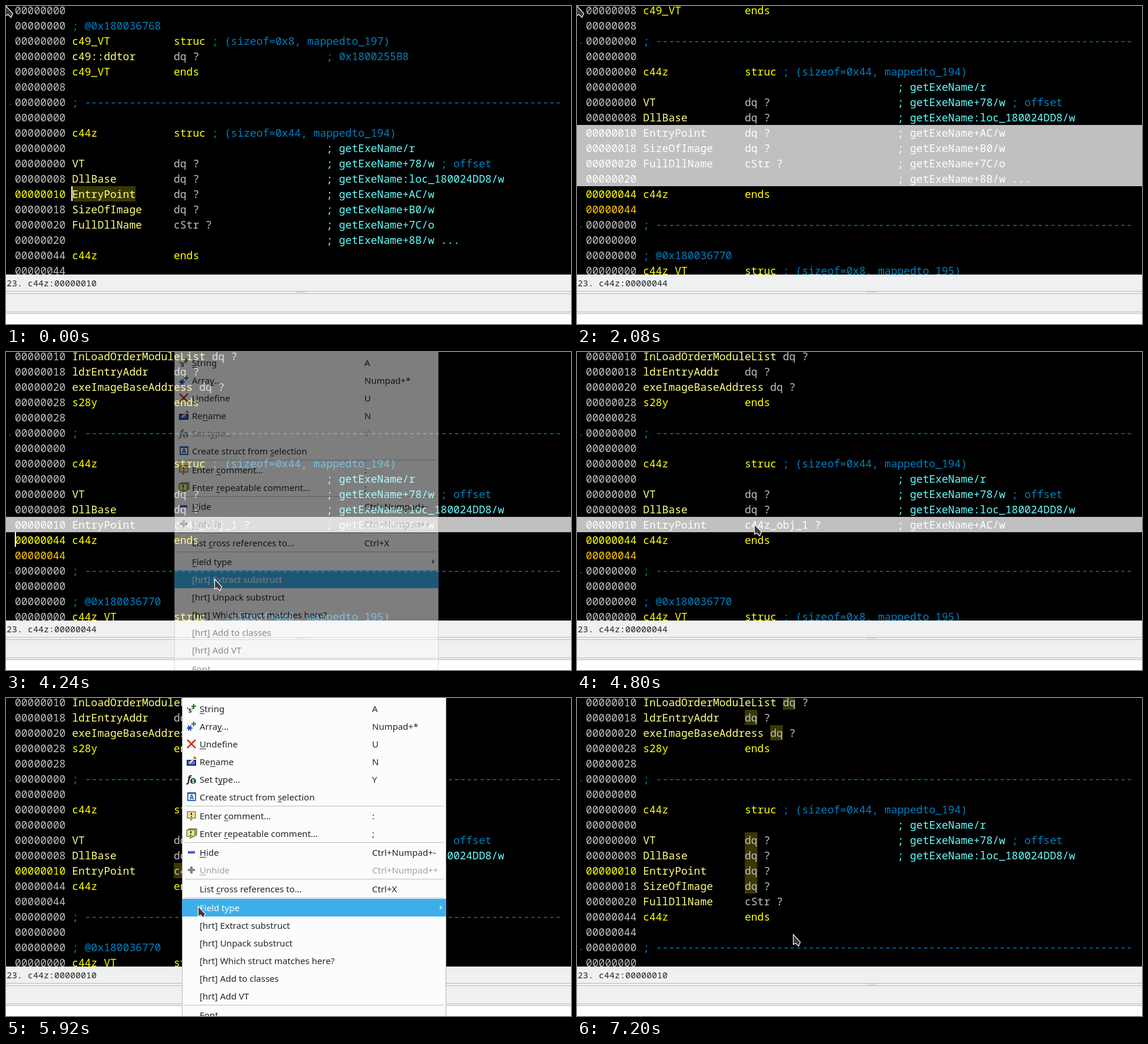
An HTML page with a canvas that plays this animation: 960 px wide and 540 px high, repeating every 7280 ms.

```html
<!DOCTYPE html>
<html>
<head>
<meta charset="utf-8">
<title>Structure editor</title>
<style>
html, body { margin: 0; width: 100%; height: 100%; overflow: hidden; background: #000; }
canvas { display: block; }
</style>
</head>
<body>
<canvas id="stage" width="960" height="540"></canvas>
<script>
const LOOP = 7280, STEP = 80, ROW = 26, CHAR = 10.8;
const MONO = '"Noto Sans Mono", monospace', SANS = '"Noto Sans", sans-serif';
const SILVER = '#c0c0c0', YELLOW = '#ffff00', FIELD = '#ffff80', BLUE = '#0080c0', CYAN = '#66ffff';
const screen = document.getElementById('stage').getContext('2d');
const layer = new OffscreenCanvas(960, 540).getContext('2d');
let ctx = screen;

// Each line: address | name | type | note | trailing note
const RULE = '; ' + '-'.repeat(75);
const parse = text => text.trim().split('\n').map(line => line.replace('RULE', RULE).split('|'));

const head = `
0|RULE
0
0|c44z|struc|; (sizeof=0x44, mappedto_194)
0|||; getExeName/r
0|VT|dq ?|; getExeName+78/w|; offset
8|DllBase|dq ?|; getExeName:loc_180024DD8/w`;
const tail = `
44|c44z|ends
44
0|RULE
0
0|; @0x180036770
0|c44z_VT|struc|; (sizeof=0x8, mappedto_195)`;
const fields = `
|EntryPoint|dq ?|; getExeName+AC/w
|SizeOfImage|dq ?|; getExeName+B0/w
|FullDllName|cStr ?|; getExeName+7C/o
||| ; getExeName+8B/w ...`.replace('| ;', '|;').trim().split('\n');
const fieldsAt = (...addresses) => '\n' + fields.map((f, i) => addresses[i] + f).join('\n');

const flat = parse(`
0
0|; @0x180036768
0|c49_VT|struc|; (sizeof=0x8, mappedto_197)
0|c49::ddtor|dq ?|; 0x1800255B8
8|c49_VT|ends
8` + head + fieldsAt(10, 18, 20, 20) + tail);
const listTop = `
10|InLoadOrderModuleList|dq ?
18|ldrEntryAddr|dq ?
20|exeImageBaseAddress|dq ?
28|s28y|ends
28` + head;
const extracted = parse(listTop + '\n10|EntryPoint|c44z_obj_1 ?|; getExeName+AC/w' + tail);
const unpacked = parse(listTop + `
10|EntryPoint|dq ?
18|SizeOfImage|dq ?
20|FullDllName|cStr ?` + tail);
const hint = parse(`
0|RULE
0
0|c44z_obj_1|struc|; (sizeof=0x34, mappedto_317)
0|||; c44z/r` + fieldsAt(0, 8, 10, 10) + `
34|c44z_obj_1|ends`);

const pad = address => address.padStart(8, '0');

function box(x, y, w, h, color) {
  ctx.fillStyle = color;
  ctx.fillRect(x, y, w, h);
}

function text(string, x, y, color, font) {
  ctx.font = font;
  ctx.fillStyle = color;
  ctx.fillText(string, x, y);
}

function shape(points, fill, stroke, width = 1) {
  ctx.beginPath();
  points.forEach(([x, y]) => ctx.lineTo(x, y));
  if (fill) { ctx.closePath(); ctx.fillStyle = fill; ctx.fill(); }
  if (stroke) { ctx.strokeStyle = stroke; ctx.lineWidth = width; ctx.stroke(); }
}

function listing(lines, x, y, { current = -1, selected = [0, 0], word } = {}) {
  lines.forEach(([address, name = '', type = '', note = '', extra = ''], i) => {
    const top = y + i * ROW;
    const inSelection = i >= selected[0] && i < selected[1];
    const isKeyword = type === 'struc' || type === 'ends';
    if (inSelection) box(0, top, 960, ROW, SILVER);

    const put = (string, column, color) => {
      if (!string) return;
      const left = x + column * CHAR;
      if (word && string.split(' ')[0] === word) box(left, top, word.length * CHAR, ROW, '#383800');
      text(string, left, top + 20, inSelection ? '#fff' : color, '18px ' + MONO);
    };
    const sameAddress = i === current + 1 && current >= 0 && lines[current][0] === address;
    put(pad(address), 0, i === current ? YELLOW : sameAddress ? '#ffc800' : SILVER);
    put(name, 9, name[0] === ';' ? BLUE : isKeyword ? YELLOW : FIELD);
    put(type, Math.max(25, name.length + 10), isKeyword ? YELLOW : SILVER);
    put(note, type === 'struc' ? 31 : 49, /getExe|\/r/.test(note) ? CYAN : BLUE);
    put(extra, 50 + note.length, BLUE);
    if (name === RULE && x < 100) shape([[4, top + 18], [10, top + 18], [7, top + 21]].map(([a, b]) => [a, b - 2]), '#262626');
  });
}

function statusBar(address) {
  box(0, 456, 960, 67, '#eff0f1');
  box(0, 523, 960, 17, '#fff');
  for (const y of [484, 488, 519, 522]) box(0, y, 960, 1, '#b8b9ba');
  for (let x = 493; x < 509; x += 3) box(x, 485, 1, 2, '#b0b1b2');
  text('23. c44z:' + pad(address), 1, 476, '#232629', '15px ' + MONO);
}

// Icons are drawn around their own centre
const plus = (x, y, r, color, w = 2) => {
  box(x - r, y - w / 2, 2 * r, w, color);
  box(x - w / 2, y - r, w, 2 * r, color);
};
const bubble = (x, y, fill) => {
  shape([[x - 7, y - 7], [x + 7, y - 7], [x + 7, y + 4], [x + 2, y + 4], [x - 1, y + 8], [x - 1, y + 4], [x - 7, y + 4], [x - 7, y - 7]], fill, '#5a4a20');
  box(x - 1, y - 5, 2, 4, '#403010');
  box(x - 1, y + 1, 2, 2, '#403010');
};
const icons = {
  string() { text("'s'", -8, 7, '#303030', 'bold 12px ' + SANS); plus(4, -4, 4, '#1d7a24'); },
  array() {
    for (let a = 0; a < 3; a++) {
      const c = 5 * Math.cos(a * Math.PI / 3), s = 5 * Math.sin(a * Math.PI / 3);
      shape([[-3 - c, 3 - s], [-3 + c, 3 + s]], null, '#2440b0', 2);
    }
    plus(4, -4, 4, '#1d7a24');
  },
  cross() {
    shape([[-7, -7], [7, 7]], null, '#c0391f', 2.5);
    shape([[7, -7], [-7, 7]], null, '#c0391f', 2.5);
  },
  rename() {
    box(-8, -3, 16, 10, '#18246c');
    box(-6, -1, 12, 6, '#4a6ee0');
    shape([[-3, 3], [6, -7]], null, '#e8d8a0', 3);
    shape([[4, -8], [8, -5]], null, '#a03020', 2);
  },
  type(disabled) {
    text('f', -7, 5, disabled ? '#8a8a8a' : '#202030', 'italic bold 16px ' + SANS);
    ctx.beginPath();
    ctx.arc(3, 3, 5, 0, 7);
    ctx.fillStyle = disabled ? '#909090' : '#1f5a34';
    ctx.fill();
    text('t', 1, 7, '#fff', 'bold 10px ' + SANS);
  },
  struct() {
    box(-7, -8, 15, 15, '#2b6cb8');
    box(-5, -5, 11, 10, '#fff');
    text('A', -3, 4, '#1c4a90', 'bold 10px ' + SANS);
  },
  comment() { bubble(0, 0, '#f4dc90'); },
  repeat() { bubble(2, -1, '#a8c060'); bubble(-1, 1, '#d8e890'); },
  minus() { box(-6, -2, 12, 4, '#2a50d0'); box(-5, -1, 10, 1, '#7090f0'); },
  plus() { plus(0, 0, 6, '#858585', 4); }
};

// Each item: row centre, label with & before the underlined letter, shortcut, icon
const items = [
  [18, '&String', 'A', 'string'], [48, 'Arra&y...', 'Numpad+*', 'array'], [78, '&Undefine', 'U', 'cross'],
  [108, 'Re&name', 'N', 'rename'], [138, 'Set t&ype...', 'Y', 'type'],
  [168, 'Create struct from &selection', '', 'struct'],
  [200, 'Enter &comment...', ':', 'comment'], [230, 'Enter &repeatable comment...', ';', 'repeat'],
  [262, '&Hide', 'Ctrl+Numpad+-', 'minus'], [292, '&Unhide', 'Ctrl+Numpad++', 'plus'],
  [324, 'List &cross references to...', 'Ctrl+X'], [356, '&Field type', ''],
  [386, '[hrt] Extract substruct'], [416, '[hrt] Unpack substruct'], [446, '[hrt] Which struct matches here?'],
  [476, '[hrt] Add to classes'], [506, '[hrt] Add VT'], [538, 'Font']
];

function menu(x, mouse, canSetType) {
  const font = '15px ' + SANS;
  box(x, 0, 449, 540, '#fcfcfc');
  box(x, 0, 1, 540, '#b4b5b6');
  box(x + 448, 0, 1, 540, '#b4b5b6');
  for (const y of [183, 245, 307, 339, 521]) box(x + 5, y, 440, 1, '#bcbdbe');
  for (const [y, label, keys = '', icon] of items) {
    const disabled = label === '&Unhide' || (icon === 'type' && !canSetType);
    const hover = !disabled && mouse.x >= x && Math.abs(mouse.y - y) < 15;
    const color = disabled ? '#a0a1a2' : hover ? '#fcfcfc' : '#232629';
    if (hover) box(x, y - 15, 449, 30, '#3daee9');
    if (icon) {
      ctx.save();
      ctx.translate(x + 16, y);
      icons[icon](disabled);
      ctx.restore();
    }
    text(label.replace('&', ''), x + 30, y + 6, color, font);
    text(keys, x + 323, y + 6, color, font);
    const mark = label.indexOf('&');
    if (mark >= 0) {
      const start = ctx.measureText(label.slice(0, mark)).width;
      box(x + 30 + start, y + 8, ctx.measureText(label[mark + 1]).width, 1, color);
    }
    if (label === '&Field type') shape([[x + 438, y - 4], [x + 443, y], [x + 438, y + 4]], hover ? '#a8dcf8' : '#7a7c7e');
  }
}

function tooltip() {
  box(319, 312, 641, 228, '#000');
  box(319, 312, 641, 1, '#555');
  box(319, 312, 1, 228, '#555');
  listing(hint, 320, 313);
}

function faded(alpha, draw) {
  if (!alpha) return;
  ctx = layer;
  ctx.clearRect(0, 0, 960, 540);
  draw();
  ctx = screen;
  ctx.globalAlpha = alpha;
  ctx.drawImage(layer.canvas, 0, 0);
  ctx.globalAlpha = 1;
}

const path = [
  [0, -1, -1], [2160, -1, -1], [2640, 292, 262], [2800, 285, 262], [3280, 285, 262], [3360, 291, 262],
  [3840, 354, 385], [4320, 354, 385], [4880, 298, 287], [5520, 298, 287], [5920, 326, 353],
  [6160, 379, 427], [6240, 379, 427], [6320, 371, 419], [6720, 371, 419], [7200, 367, 401]
];

function mouseAt(t) {
  const next = path.findIndex(key => key[0] > t);
  if (next < 0) return { x: 367, y: 401 };
  const [t0, x0, y0] = path[next - 1], [t1, x1, y1] = path[next];
  const p = (t - t0) / (t1 - t0), e = p * p * (3 - 2 * p);
  return { x: Math.round(x0 + (x1 - x0) * e), y: Math.round(y0 + (y1 - y0) * e) };
}

// Opacity of a popup that opens at `from` and starts closing at `to`
const popup = (t, from, to, last) =>
  t < from || t >= to + STEP ? 0 : t >= to ? last : t < from + STEP ? 0.5 : 1;

const caretToggles = [0, 400, 720, 1440, 1760, 2080, 2400, 2720, 4240, 4560, 4880, 5280, 6640, 6960];

function render(t) {
  const mouse = mouseAt(t);
  const scroll = [720, 880, 960, 1120].filter(s => t >= s).length;
  const clicked = t >= 4960;
  let lines, current = 12, selected = [0, 0], word, caretX = 15;

  if (t < 4240) {
    lines = flat.slice(scroll, scroll + 18);
    selected = [12 - scroll, 12];
    if (t < 80) { word = 'EntryPoint'; caretX = 111; }
  } else {
    lines = t < 6640 ? extracted : unpacked;
    if (clicked) {
      current = 11;
      caretX = 295;
      word = t < 6640 ? 'c44z_obj_1' : 'dq';
    } else selected = [11, 12];
  }

  box(0, 0, 960, 540, '#000');
  listing(lines, 15, -6, { current, selected, word });
  if (caretToggles.filter(s => t >= s).length % 2) box(caretX, current * ROW - 6, 2, 25, '#fff');
  statusBar(lines[current][0]);

  faded(popup(t, 5200, 5360, 0.22), tooltip);
  faded(popup(t, 2960, 4240, 0.5), () => menu(286, mouse, false));
  faded(popup(t, 5440, 6640, 0.5), () => menu(299, mouse, true));

  const arrow = [[0, 0], [0, 17], [4, 15], [9, 20], [12, 13], [0, 0], [0, 1]];
  shape(arrow.map(([x, y]) => [mouse.x + x + 0.5, mouse.y + y + 0.5]), '#3c3c3c', '#fff', 1.2);
}

function tick() {
  const t = performance.now() % LOOP;
  render(Math.floor(t / STEP) * STEP);
  requestAnimationFrame(tick);
}
tick();
</script>
</body>
</html>
```
